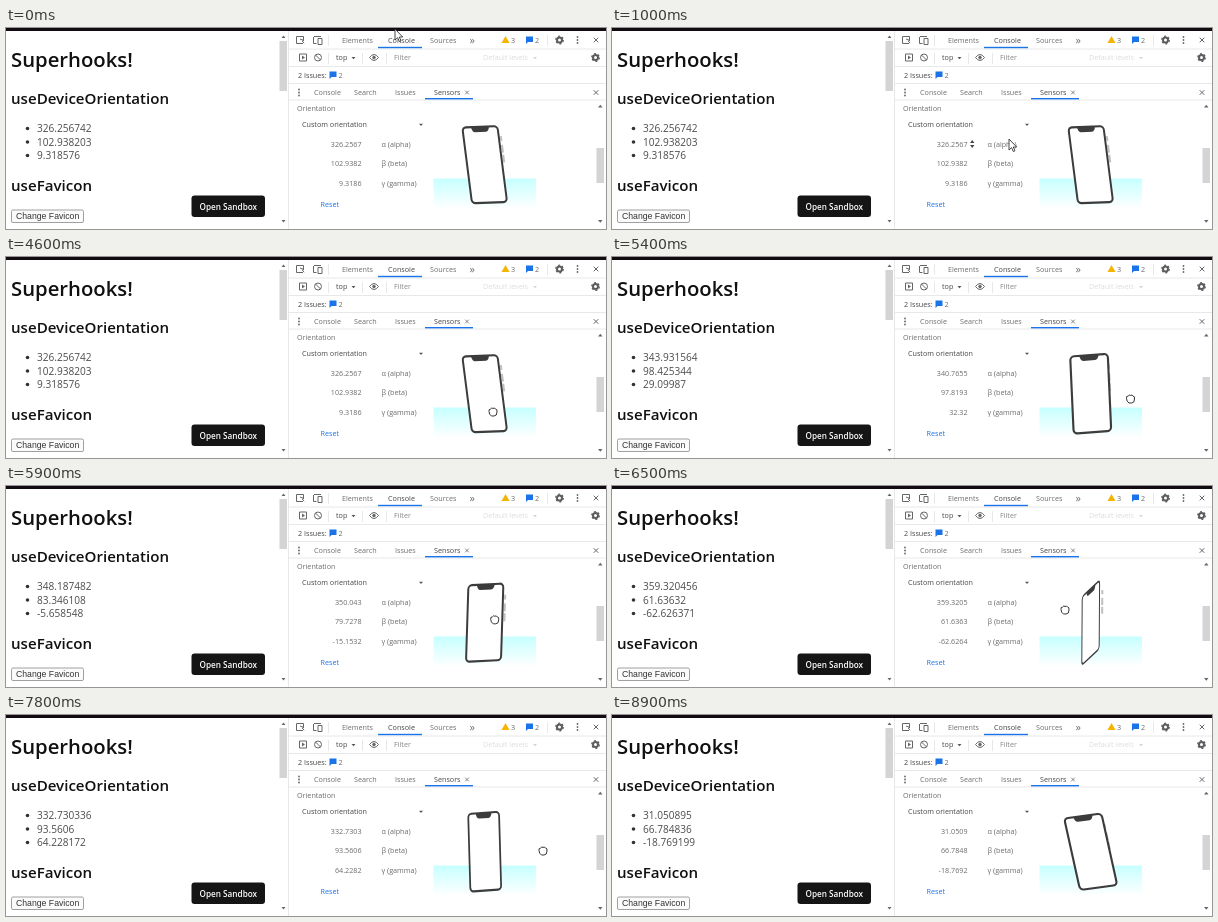
Recreate the animation shown at these times as an HTML page. Size 600x201 px, loop 9800 ms.

```html
<!DOCTYPE html>
<html lang="en">
<head>
<meta charset="utf-8">
<title>Device orientation demo</title>
<style>
  html, body { margin: 0; width: 100%; height: 100%; overflow: hidden; background: #fff; }
  svg { display: block; width: 100vw; height: 100vh; }
  text { font: 7.2px "Open Sans", "Noto Sans", sans-serif; fill: #6c6c6c; white-space: pre; }
  .h1 { font-size: 20.3px; font-weight: 600; fill: #111; }
  .h2 { font-size: 15.1px; font-weight: 600; fill: #111; }
  .item { font-size: 10.1px; fill: #4c4c4c; }
  .btn { font: 8.7px "Liberation Sans", Arial, sans-serif; fill: #333; }
  .open { font-size: 8.2px; font-weight: 600; fill: #fff; }
  .more { font-size: 11px; }
  .dark { fill: #444; }
  .end { text-anchor: end; }
  .line { fill: none; stroke: #666; stroke-width: 1; }
  .rule { stroke: #e8e8e8; stroke-width: 1; }
</style>
</head>
<body>
<svg viewBox="0 0 600 201" preserveAspectRatio="none">
  <defs>
    <linearGradient id="floor" x2="0" y2="1">
      <stop stop-color="#c6ffff"/><stop offset="1" stop-color="#fff"/>
    </linearGradient>
    <g id="gear" fill="none" stroke="#5c5c5c">
      <circle r="2.5" stroke-width="2"/>
      <circle r="3.8" stroke-width="1.2" stroke-dasharray="2 1.98"/>
    </g>
    <path id="close" class="line" d="M-2.3-2.3 2.3 2.3M2.3-2.3-2.3 2.3"/>
    <path id="down" d="M-2-1H2L0 1.3z" fill="#555"/>
    <path id="bubble" d="M-3.5-3.5h7v5.5h-5l-2 2z" fill="#1a73e8"/>
    <g id="dots" fill="#666"><circle cy="-3" r=".9"/><circle r=".9"/><circle cy="3" r=".9"/></g>
  </defs>

  <rect width="600" height="201" fill="#fff"/>

  <!-- page -->
  <text class="h1" x="5" y="39">Superhooks!</text>
  <text class="h2" x="5" y="75.5">useDeviceOrientation</text>
  <g fill="#333">
    <circle cx="21.5" cy="100.5" r="1.8"/><circle cx="21.5" cy="114" r="1.8"/><circle cx="21.5" cy="127.5" r="1.8"/>
  </g>
  <text class="item" x="31" y="104"></text>
  <text class="item" x="31" y="117.7"></text>
  <text class="item" x="31" y="131.3"></text>
  <text class="h2" x="5" y="163">useFavicon</text>
  <rect x="5.5" y="182" width="72" height="12.5" rx="1.5" fill="#fbfbfb" stroke="#a0a0a0"/>
  <text class="btn" x="10" y="191.3">Change Favicon</text>
  <rect x="185.5" y="167.5" width="73.5" height="21.5" rx="3" fill="#151515"/>
  <text class="open" x="193.5" y="182">Open Sandbox</text>
  <rect x="273.5" y="13" width="7.500" height="50" fill="#d4d4d4"/>
  <path d="M275.500 10h4l-2-2.500zM275.500 192h4l-2 2.500z" fill="#666"/>

  <!-- developer tools -->
  <path class="rule" d="M282.5 3V201M283 21H600M283 38.5H600M283 55.5H600M283 72H600M322.5 7V18M541.5 7V18M322.5 25V36M356.5 25V36M380.5 25V36"/>
  <g class="line">
    <path d="M297 15.500h-6.500v-7h7v3.500M294 11l4 1.500-1.800.7 2 2"/>
    <path d="M307.500 9v6.500h3M308 8.500h7M312 10.500h4v6h-4z"/>
    <path d="M293.500 26h7v7h-7z"/>
    <circle cx="312" cy="29.500" r="3.500"/><path d="M309.500 27l5 5"/>
    <path d="M363.500 29.500q4.500-6 9 0q-4.500 6-9 0z"/><circle cx="368" cy="29.500" r="1.300" fill="#666"/>
  </g>
  <path d="M296 27.500l3 2-3 2z" fill="#666"/>
  <text x="336" y="14.700">Elements</text>
  <text class="dark" x="382" y="14.700">Console</text>
  <text x="424" y="14.700">Sources</text>
  <text class="more" x="463.500" y="15.500">»</text>
  <rect x="372" y="18.800" width="44" height="1.400" fill="#1a73e8"/>
  <path d="M499.500 8l4 7h-8z" fill="#f4b400"/>
  <text x="505" y="14.700">3</text>
  <use href="#bubble" x="523.500" y="12"/>
  <text x="529" y="14.700">2</text>
  <use href="#gear" x="553.500" y="12"/>
  <use href="#dots" x="571.500" y="12"/>
  <use href="#close" x="590" y="12"/>

  <text class="dark" x="330" y="32.300">top</text><use href="#down" x="347.500" y="30"/>
  <text x="388" y="32.300" style="fill:#858585">Filter</text>
  <text x="477" y="32" style="fill:#dcdcdc">Default levels</text>
  <use href="#down" x="529" y="30" opacity=".25"/>
  <use href="#gear" x="589.500" y="29.500"/>

  <text class="dark" x="292" y="49.500">2 Issues:</text>
  <use href="#bubble" x="327" y="47"/>
  <text x="332.500" y="49.500">2</text>

  <use href="#dots" x="293" y="64.500"/>
  <text x="308" y="67.300">Console</text>
  <text x="348" y="67.300">Search</text>
  <text x="389" y="67.300">Issues</text>
  <text class="dark" x="428" y="67.300">Sensors</text>
  <use href="#close" transform="translate(461 64.500) scale(.8)"/>
  <use href="#close" x="590" y="64.500"/>
  <rect x="419" y="70" width="48" height="1.400" fill="#1a73e8"/>

  <text x="291" y="83">Orientation</text>
  <text class="dark" x="296" y="99">Custom orientation</text>
  <use href="#down" x="415" y="96.700"/>
  <text class="angle end" x="355.500" y="118.500"></text>
  <text class="angle end" x="355.500" y="138"></text>
  <text class="angle end" x="355.500" y="157.500"></text>
  <text x="375.500" y="118.500">α (alpha)</text>
  <text x="375.500" y="138">β (beta)</text>
  <text x="375.500" y="157.500">γ (gamma)</text>
  <text x="314.500" y="179" style="fill:#1a73e8">Reset</text>
  <path id="spinner" d="M358 115h4.400l-2.200-3zM358 117h4.400l-2.200 3z" fill="#444"/>
  <rect x="590.500" y="120" width="7.500" height="35" fill="#d4d4d4"/>
  <path d="M592 79.500h4.500l-2.200-2.700zM592 192h4.500l-2.200 2.700z" fill="#666"/>

  <!-- phone -->
  <rect x="427.500" y="150.500" width="102.500" height="30" fill="url(#floor)"/>
  <path id="keys" d="M20.500-28v5M20.500-19v8M20.500-9v8" fill="none" stroke="#c0c0c0" stroke-width="2" vector-effect="non-scaling-stroke"/>
  <g id="front">
    <rect x="-19.300" y="-38.900" width="38.600" height="77.800" rx="4" fill="#fff" stroke="#3c3c3c" stroke-width="2.200"/>
    <path d="M-10-39H10Q9-33.500 6-33.500H-6Q-9-33.500-10-39z" fill="#3c3c3c"/>
  </g>

  <rect width="600" height="3" fill="#120b12"/>

  <!-- pointers -->
  <g id="pointer" stroke="#333">
    <path d="M0 0V11L2.600 8.600 4.300 12.500 6 11.800 4.300 8H7.700z" fill="#fff" stroke-width=".9"/>
    <path d="M-2-5H2M0-5V5M-2 5H2" fill="none"/>
    <path d="M-4-.5Q-4.500-3-2.300-3Q-1.500-4.600 0-3.600Q1.800-4.600 2.500-2.900Q4.500-3 4 0Q4 4 1 4H-1.500Q-4 2.500-4-.5z" fill="#fff"/>
  </g>
</svg>
<script>
const LOOP = 9800, STEP = 100;
const $ = s => document.querySelector(s), all = s => [...document.querySelectorAll(s)];
const items = all('.item'), angles = all('.angle'), pointers = all('#pointer path');

// time, alpha, beta, gamma
const A = [-33.743258, 102.938203, 9.318576], B = [-.679544, 61.63632, -62.626371],
      C = [-27.269664, 93.5606, 64.228172], D = [31.050895, 66.784836, -18.769199];
const poses = [
  [0, ...A], [4600, ...A], [5300, -16.068436, 98.425344, 29.09987], [5400, -19.2345, 97.8193, 32.32],
  [6400, ...B], [6500, ...B], [7700, ...C], [7800, ...C], [8800, ...D], [9800, ...D]
];
// time, x, y
const path = [
  [0, 389, 1], [100, 389, 3], [1000, 397, 111], [1100, 397, 111], [1500, 325, 100], [1800, 325, 100],
  [1900, 386, 98], [2400, 386, 100], [2900, 362, 120], [3000, 362, 120], [3100, 369, 128],
  [3300, 369, 128], [3400, 374, 133], [3600, 374, 133], [4600, 487, 155], [5400, 518.5, 142],
  [6500, 453, 124], [7800, 537, 136], [8900, 517, 127], [9800, 517, 127]
];

function at(keys, t) {
  const i = Math.max(1, keys.findIndex(k => k[0] >= t));
  const a = keys[i - 1], b = keys[i], u = (t - a[0]) / (b[0] - a[0]);
  return a.slice(1).map((v, n) => v + (b[n + 1] - v) * u);
}

function write(nodes, [alpha, beta, gamma], digits) {
  [(alpha + 360) % 360, beta, gamma].forEach((v, i) => nodes[i].textContent = +v.toFixed(digits));
}

// Z-X-Y device rotation, seen from the front
function turnPhone(pose) {
  const [sa, sb, sg] = pose.map(d => Math.sin(d * Math.PI / 180));
  const [ca, cb, cg] = pose.map(d => Math.cos(d * Math.PI / 180));
  const m = [ca * cg - sa * sb * sg, cb * sg, cb * sa, sb];
  const normal = [ca * sg + cg * sa * sb, -cb * cg];
  const place = (id, depth) => $(id).setAttribute('transform',
    `matrix(${[...m, 478.7 - normal[0] * depth, 136.7 - normal[1] * depth]})`);
  place('#front', 0);
  place('#keys', 2.5);
}

function draw(now) {
  const t = Math.floor(now % LOOP / STEP) * STEP;
  const pose = at(poses, t);
  write(items, at(poses, Math.max(0, t - STEP)), 6);
  write(angles, pose, 4);
  turnPhone(pose);

  const [x, y] = at(path, t);
  const kind = t >= 4200 ? 2 : t >= 2700 && t < 3700 ? 1 : 0;
  $('#pointer').setAttribute('transform', `translate(${x} ${y})`);
  pointers.forEach((p, i) => p.style.display = i === kind && t < 8900 ? '' : 'none');
  const hover = t >= 1000 && t < 1500 || t >= 3100 && t < 3400;
  $('#spinner').style.display = hover ? '' : 'none';
}

const start = performance.now();
function tick() {
  draw(performance.now() - start);
  requestAnimationFrame(tick);
}
tick();
</script>
</body>
</html>
```
